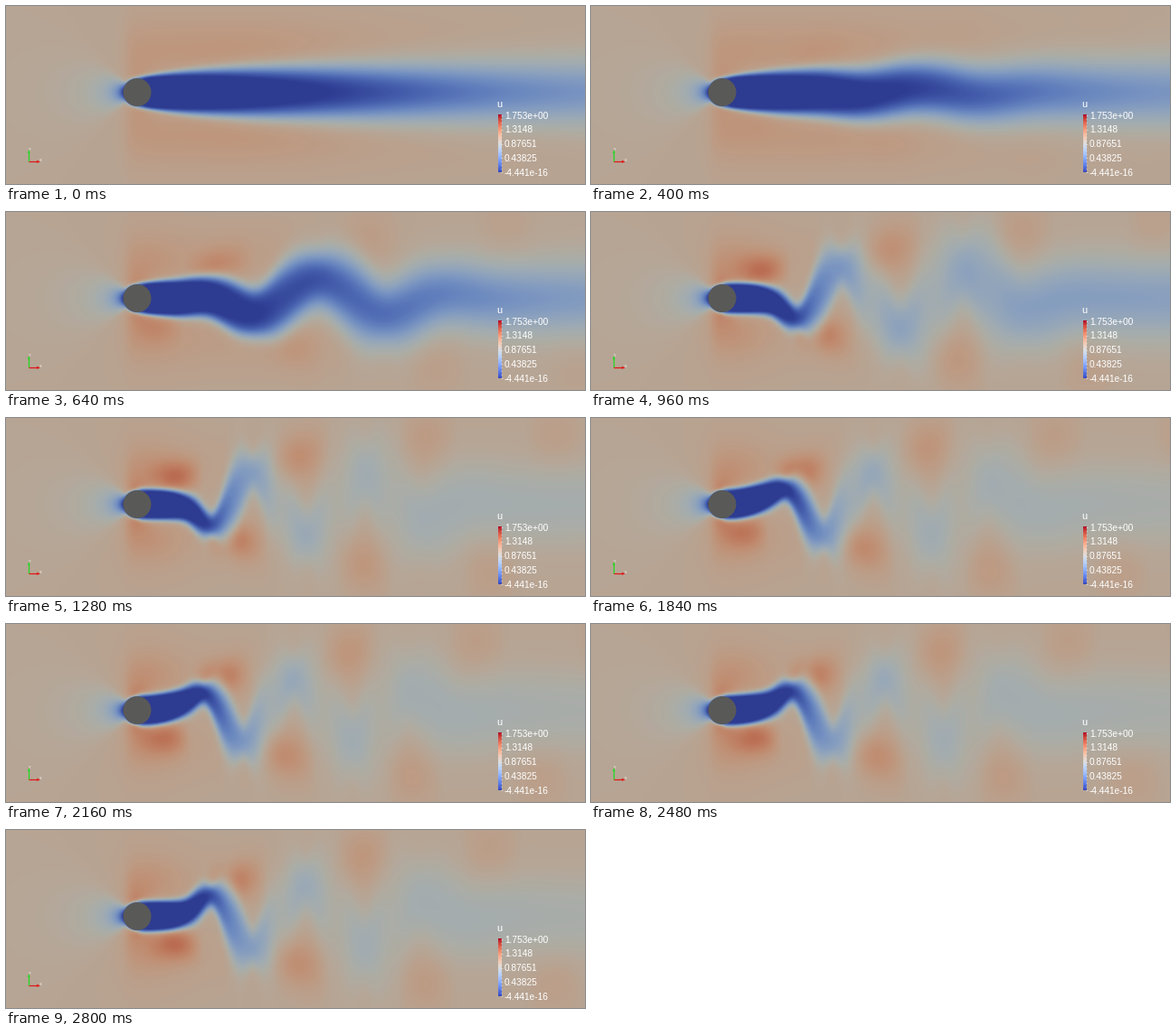
Write a matplotlib script that moves like this. It is 640 px wide and 197 px high and loops after 2880 ms.

```python
import numpy as np
import matplotlib.pyplot as plt
from matplotlib.animation import FuncAnimation
from matplotlib.patches import Circle

W, H, DPI = 640, 197, 100
FRAMES, STEP = 36, 80
CX, CY, R = 145, 95.5, 15.5
FREE = 0.57                              # free stream on the 0..1 colour scale
SHADE = np.array([0.775, 0.785, 0.755])  # surface lighting
CMAP = plt.get_cmap("coolwarm")

x = np.arange(W) + 0.5
X, Y = np.meshgrid(x, np.arange(H) + 0.5)
DY = Y - CY


def sig(v):
    return 1 / (1 + np.exp(-np.clip(v, -60, 60)))


def ramp(start, span):
    """Eased rise from 0 to 1 along x."""
    t = np.clip((x - start) / span, 0, 1)
    return t * t * (3 - 2 * t)


def decay(start, length):
    return np.exp(-np.clip(x - start, 0, None) / length)


def bell(v, width):
    return np.exp(-(v / width) ** 2)


def mix(a, b, t):
    return a + (b - a) * t


# Steady wake: half width, shear layer thickness, deficit
H0 = 26 - 9 * decay(150, 50) - 6 * ramp(250, 400)
S0 = 2.5 + 0.056 * np.clip(x - 160, 0, None)
D0 = 1.12 - 0.29 * ramp(220, 430)
SPREAD = 10 * ramp(260, 120)

# Shedding wake
H1 = 17 - 6 * bell(x - 225, 30) + 20 * ramp(260, 260)
S1 = 3 + 25 * ramp(160, 270)
D1 = 0.14 + 0.34 * decay(260, 150) + 0.67 * sig((240 - x) / 10)
CLUMP = 0.55 * ramp(250, 60) * (1 - ramp(400, 80))
WAKE_X = 205 + 8 * np.logaddexp(0, (x - 205) / 8)
LAG = x - WAKE_X + 49 * np.exp(-(WAKE_X - 210) / 65)

# Fast lobes on either side of the wake
LOBE = (0.03 + 0.15 * decay(230, 110)) * ramp(120, 80)
LOBE_Y = 30 + 44 * ramp(170, 300)
LOBE_S = 18 + 14 * ramp(180, 250)

# Flow around the cylinder
r = np.hypot(X - CX, DY)
cos2 = ((X - CX) ** 2 - DY ** 2) / np.maximum(r, 1) ** 2
DIPOLE = -FREE * cos2 * (R / np.maximum(r, R)) ** 1.7
STAGNATION = np.where((cos2 > 0) & (X < CX), DIPOLE, 0)
SIDES = np.where(cos2 < 0, DIPOLE, 0)
SKIN = 1 - np.exp(-np.clip(r - R + 0.8, 0, None) / 1.4)
FRONT = sig((X - 133) / 3)
BEHIND = sig((X - 147) / 2)
ATTACHED = 0.07 * FRONT * bell(X - 160, 45) * bell(abs(DY) - 35, 30)
BYPASS = (0.07 * FRONT * (0.25 + 0.75 * bell(X - 245, 150))
          * bell(abs(DY) - 48, 38))


def phase_at(n):
    """Shedding cycles passed; the rate rises slightly, then holds."""
    return 0.763 * n - 12.03 + 0.13 * np.logaddexp(0, 12 - n)


def flow(n):
    grown = sig((n - 7.5) / 1.3)
    shed = sig(n - 9.8 - (x - 250) / 130)
    wave = 141 + 19 * sig(11 - n)
    turn = 2 * np.pi * ((x - 300) / wave - phase_at(n))

    swing = np.cos(turn - 2 * np.pi * mix(33, LAG, shed) / wave)
    sway = 34 * ramp(150 + 85 * (1 - grown), 125) * bell(
        np.clip(x - 380, 0, None), 100)
    mid = grown * sway * swing
    off = (DY - mid) / np.sqrt(1 + np.gradient(mid) ** 2)
    half = mix(H0, H1, shed)
    soft = mix(S0 + grown * SPREAD, S1, shed)
    band = 0.5 * (np.tanh((half - off) / soft) + np.tanh((half + off) / soft))
    deficit = mix(D0, D1, shed) * (1 - CLUMP * shed * (1 - swing ** 2))

    lobes = 0
    for side in (-1, 1):
        power = np.clip(-side * np.cos(turn), 0, 1) ** 1.15
        lobes = lobes + LOBE * power * bell(DY - side * LOBE_Y, LOBE_S)

    fast = (FREE + STAGNATION + mix(0.12, 0.28, grown) * SIDES
            + mix(0.1, 0.9, grown) * ATTACHED
            + (1 - 0.8 * grown) * BYPASS + grown * lobes * FRONT)
    return np.clip(fast * (1 - deficit * band * BEHIND) * SKIN, 0, 1)


def shade(n):
    return CMAP(flow(n))[..., :3] * SHADE


fig = plt.figure(figsize=(W / DPI, H / DPI), dpi=DPI)
ax = fig.add_axes([0, 0, 1, 1])
image = ax.imshow(shade(0), extent=(0, W, H, 0), interpolation="nearest",
                  aspect="auto")
ax.add_patch(Circle((CX, CY), R, fc="#595958", ec="none", zorder=3))


def line(xs, ys, color, lw):
    ax.plot(xs, ys, color=color, lw=lw, solid_capstyle="butt", zorder=4)


def label(px, py, text, px_size, **kw):
    ax.text(px, py, text, color="white", fontsize=px_size * 72 / DPI,
            family="Liberation Sans", va="center_baseline", zorder=5, **kw)


# Orientation axes
line([25, 25], [172, 160], "#20d820", 0.9)
line([25, 36], [172.3, 172.3], "#e01818", 0.9)
ax.fill([24, 26.5, 25.2], [163, 163, 159], color="#20d820", lw=0, zorder=4)
ax.fill([34, 34, 38], [170.8, 173.8, 172.3], color="#e01818", lw=0, zorder=4)
label(26.5, 158.5, "Y", 4, ha="center")
label(38, 170.5, "X", 4, ha="center")

# Colour legend
ax.imshow(np.linspace(1, 0, 64)[:, None], cmap=CMAP, aspect="auto",
          extent=(543.5, 547.5, 184.5, 121), zorder=4)
for i in range(17):
    ty = 121 + i * 63 / 16
    line([547, 549 if i % 4 == 0 else 548], [ty, ty], "#e8e4e0", 0.5)
names = ["1.753e+00", "1.3148", "0.87651", "0.43825", "-4.441e-16"]
for i, name in enumerate(names):
    label(551, 120.5 + 15.9 * i, name, 10.1)
label(545.5, 107.5, "u", 11, ha="center")

ax.set_xlim(0, W)
ax.set_ylim(H, 0)
ax.axis("off")


def update(n):
    image.set_data(shade(n))
    return [image]


anim = FuncAnimation(fig, update, frames=FRAMES, interval=STEP, repeat=True,
                     repeat_delay=0, blit=False)
plt.show()
```
